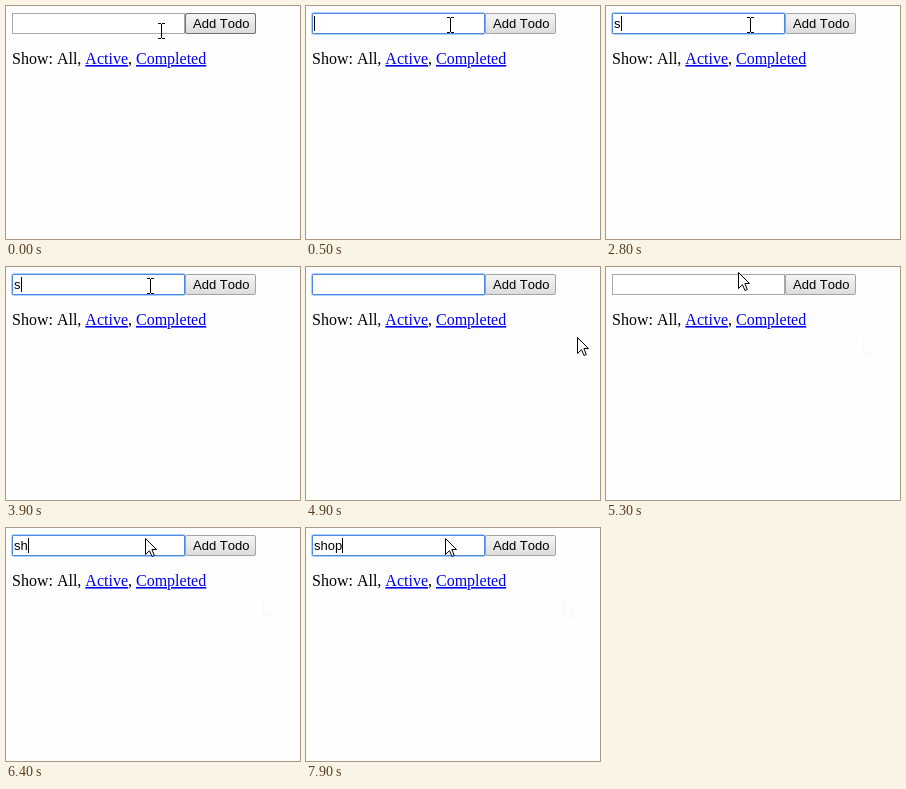
Animation of 294 by 233 pixels, one loop 8000 ms. Source, as an HTML page:

```html
<!DOCTYPE html>
<html lang="en">
<head>
<meta charset="utf-8">
<title>Todo input</title>
<style>
  html, body { margin: 0; width: 100%; height: 100%; overflow: hidden; background: #fefefe; }
  svg { display: block; width: 100%; height: 100%; }
  text { white-space: pre; font-kerning: none; }
  .ui { font: 13px "Liberation Sans", Arial, sans-serif; font-kerning: none; }
  .page { font: 16px "Liberation Serif", "Times New Roman", serif; font-kerning: none; }
  .link { fill: #00e; text-decoration: underline 1px; text-underline-offset: 1px; }
  .arrow { fill: #fff; stroke: #000; }
  .beam { fill: none; stroke: #000; }
</style>
</head>
<body>
<svg viewBox="0 0 294 233">
  <defs>
    <linearGradient id="face" x2="0" y2="1">
      <stop offset="0" stop-color="#f6f6f6"/>
      <stop offset="1" stop-color="#dcdcdc"/>
    </linearGradient>
    <path id="arrowShape" stroke-linejoin="round" d="M.5 .5V16.5L4.5 12.7L7 18.5L9.3 17.5L6.9 11.5H11.5Z"/>
  </defs>

  <rect x="6.5" y="7.5" width="172" height="20" fill="#fff" stroke="#a9a9a9"/>
  <g id="ring" fill="none">
    <rect x="5.5" y="6.5" width="174" height="22" rx="2" stroke="#b0cefa"/>
    <rect x="6.5" y="7.5" width="172" height="20" rx="1" stroke="#4b8ae0"/>
  </g>
  <text id="field" class="ui" x="8" y="22"></text>
  <rect id="caret" x="8" y="10" width="1" height="15"/>

  <rect x="179.5" y="7.5" width="70" height="20" rx="1.5" fill="url(#face)" stroke="#a3a3a3"/>
  <rect id="hover" x="179.5" y="7.5" width="70" height="20" rx="1.5" fill="none" stroke="#707070"/>
  <text class="ui" x="187" y="22">Add Todo</text>

  <text class="page" x="6" y="58">Show: All, <tspan class="link">Active</tspan>, <tspan class="link">Completed</tspan></text>

  <use id="trail" href="#arrowShape" x="257" y="72" fill="#fefefe" stroke="#f8f8f8"/>
  <use id="arrow" class="arrow" href="#arrowShape"/>
  <path id="beam" class="beam" d="M-3-7.5H0M1-7.5H4M.5-7V7M-3 7.5H0M1 7.5H4"/>
</svg>
<script>
const LOOP = 8000;
const $ = id => document.getElementById(id);

const beam = (x, y) => ({ pointer: 'beam', x, y });
const arrow = (x, y) => ({ pointer: 'arrow', x, y });
const type = text => ({ text, caret: true });
const blink = caret => ({ caret });
const focus = { focused: true, caret: true };
const blur = { focused: false, caret: false };

// Each step changes part of the state and holds until the next one.
const steps = [
  [0, { ...beam(155, 25), ...blur, text: '', trail: false, hover: true }],
  [100, { ...beam(146, 21), hover: false }],
  [200, beam(140, 19)],
  [300, { ...beam(138, 19), ...focus }],
  [500, beam(144, 19)],
  [800, blink(false)],
  [1300, blink(true)],
  [1600, type('o')],
  [1800, type('op')],
  [2000, type('o')],
  [2200, type('')],
  [2700, blink(false)],
  [2800, type('s')],
  [2900, type('st')],
  [3100, type('sto')],
  [3600, blink(false)],
  [3700, type('st')],
  [3900, type('s')],
  [4100, type('')],
  [4500, blink(false)],
  [4700, arrow(175, 36)],
  [4800, arrow(235, 64)],
  [4900, arrow(271, 70)],
  [5000, { ...arrow(257, 72), ...blur }],
  [5100, { ...arrow(220, 40), trail: true }],
  [5200, arrow(150, 0)],
  [5300, arrow(132, 5)],
  [5400, beam(132, 14)],
  [5500, beam(133, 13)],
  [5600, beam(134, 13)],
  [5700, focus],
  [5800, beam(137, 14)],
  [5900, arrow(139, 10)],
  [6200, blink(false)],
  [6300, type('s')],
  [6400, type('sh')],
  [6800, type('shi')],
  [7300, type('sh')],
  [7700, type('sho')],
  [7900, type('shop')]
];

const advance = { t: 4, i: 3 };
const caretX = text => [...text].reduce((x, c) => x + (advance[c] || 7), 8);
const show = (id, on) => $(id).setAttribute('visibility', on ? 'visible' : 'hidden');

function render(time) {
  const s = Object.assign({}, ...steps.filter(([at]) => at <= time).map(([, change]) => change));
  $('field').textContent = s.text;
  $('caret').setAttribute('x', caretX(s.text));
  show('caret', s.caret);
  show('ring', s.focused);
  show('trail', s.trail);
  show('hover', s.hover);
  for (const id of ['arrow', 'beam']) {
    show(id, s.pointer === id);
    $(id).setAttribute('transform', `translate(${s.x} ${s.y})`);
  }
}

const start = performance.now();
function tick() {
  render((performance.now() - start) % LOOP);
  requestAnimationFrame(tick);
}
tick();
</script>
</body>
</html>
```
